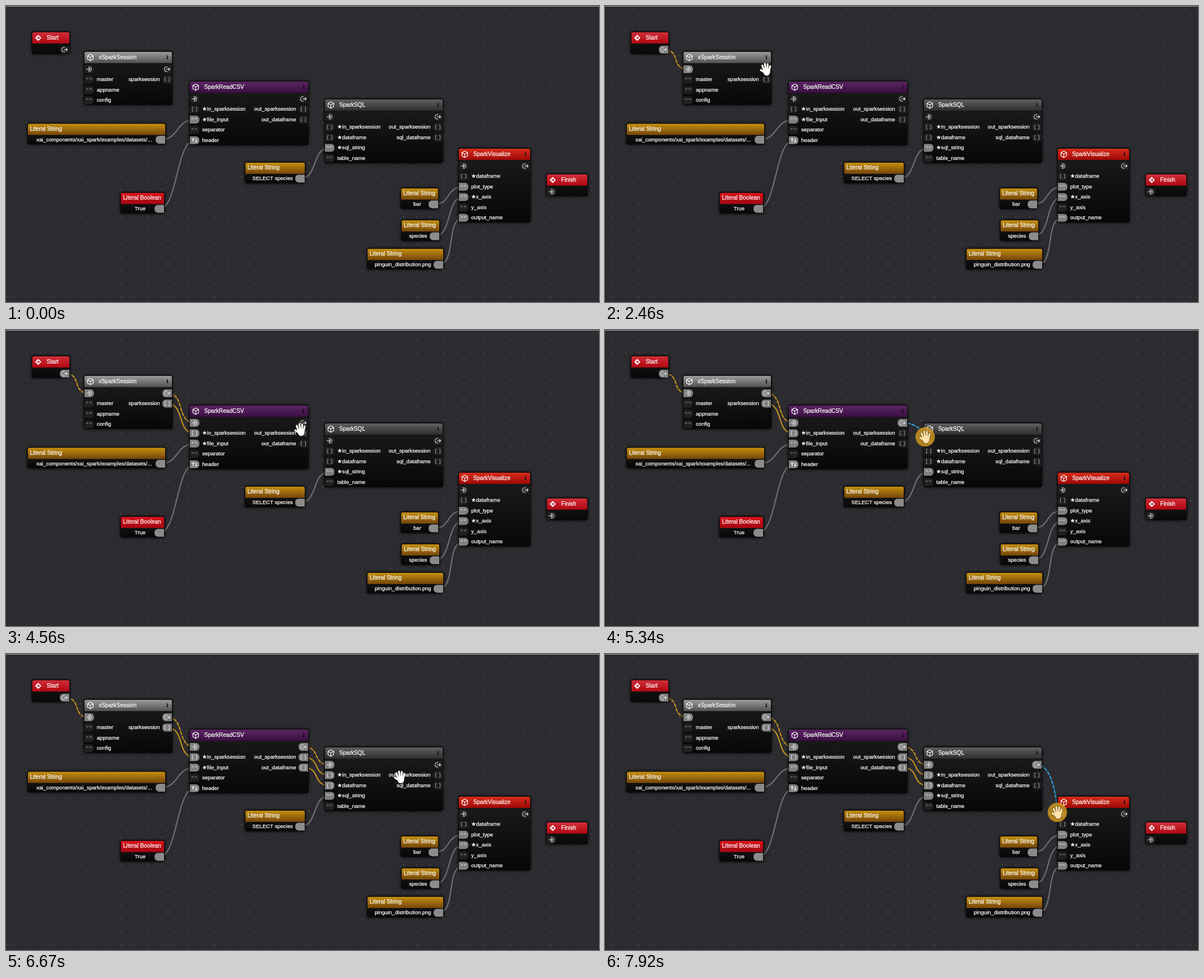
An HTML page with a canvas that plays this animation: 1058 px wide and 529 px high, repeating every 7.99 s.

```html
<!DOCTYPE html>
<html lang="en">
<head>
<meta charset="utf-8">
<title>Node graph</title>
<style>
html, body { margin: 0; width: 100%; height: 100%; overflow: hidden; background: #2c2b2f; }
canvas { display: block; }
</style>
</head>
<body>
<canvas id="stage" width="1058" height="529"></canvas>
<script>
const c = document.getElementById('stage').getContext('2d');
const LOOP = 7990, TAU = Math.PI * 2;
const FONT = '"Liberation Sans", Arial, "DejaVu Sans", sans-serif';
const RED = ['#d2303a', '#b00712'], GOLD = ['#c9930f', '#74450a'];

// Ports: first letter is the type (s string, l list, b boolean, x flow); a "!" marks one already wired.
const node = (title, x, y, w, h, head, ins, outs) => ({ title, x, y, w, h, head, ins, outs });
const start = node('Start', 46, 46, 68, 40, RED, [], ['x']);
const session = node('xSparkSession', 139, 81, 158, 96, ['#a0a0a0', '#505050'],
  ['x', 's master', 's appname', 's config'], ['x', 'l sparksession']);
const reader = node('SparkReadCSV', 327, 134, 213, 115, ['#5c2664', '#3a0f42'],
  ['x', 'l ★in_sparksession', 's!★file_input', 's separator', 'b!header'],
  ['x', 'l out_sparksession', 'l out_dataframe']);
const sql = node('SparkSQL', 568, 166, 212, 115, ['#626262', '#2e2e2e'],
  ['x', 'l ★in_sparksession', 'l ★dataframe', 's!★sql_string', 's table_name'],
  ['x', 'l out_sparksession', 'l sql_dataframe']);
const chart = node('SparkVisualize', 807, 254, 129, 133, ['#d9301c', '#a00808'],
  ['x', 'l ★dataframe', 's!plot_type', 's!★x_axis', 's y_axis', 's!output_name'], ['x']);
const finish = node('Finish', 964, 300, 74, 40, RED, ['x'], []);
const nodes = [start, session, reader, sql, chart, finish];

const literal = (x, y, w, value, to, row, title = 'Literal String', head = GOLD) =>
  ({ x, y, w, h: 38, value, to, row, title, head });
const literals = [
  literal(38, 209.5, 247, 'xai_components/xai_spark/examples/datasets/...', reader, 2),
  literal(204, 333, 79, 'True', reader, 4, 'Literal Boolean', ['#dc141e', '#a00710']),
  literal(426, 279, 108, 'SELECT species', sql, 3),
  literal(704, 325, 68, 'bar', chart, 2),
  literal(705, 382, 69, 'species', chart, 3),
  literal(644, 433, 137, 'pinguin_distribution.png', chart, 5)
];

// Wires made during the loop: pressed at, dropped at.
const wire = (from, a, to, b, press, drop) => ({ from, a, to, b, press, drop });
const wires = [
  wire(start, 0, session, 0, 1260, 1700),
  wire(session, 0, reader, 0, 2740, 3590),
  wire(session, 1, reader, 1, 3900, 3900),
  wire(reader, 0, sql, 0, 4800, 6230),
  wire(reader, 1, sql, 1, 6340, 6340),
  wire(reader, 2, sql, 2, 6340, 6340),
  wire(sql, 0, chart, 0, 7420, Infinity)
];

// Pointer path: time, x, y
const path = [
  [530, 62, 2], [940, 105, 76], [1400, 106, 77], [1550, 128, 104], [1690, 147, 111.5],
  [1830, 149, 112], [2180, 238, 112], [2390, 287, 113], [2890, 287, 113], [3020, 300, 125],
  [3370, 326, 160], [3520, 332, 166], [3899, 332, 166], [3900, 436, 208], [4550, 525, 178],
  [4700, 530, 168], [4980, 531, 167], [5550, 598, 207], [6150, 579, 203], [6339, 578, 202],
  [6340, 660, 230], [6460, 680, 227], [7200, 769, 198], [7350, 769, 196], [7440, 771, 198],
  [7570, 771, 198], [7900, 807, 283]
];

function pointerAt(t) {
  const i = path.findIndex(k => k[0] > t);
  if (i < 0) return path[path.length - 1].slice(1);
  const [t0, x0, y0] = path[i - 1], [t1, x1, y1] = path[i];
  const p = (t - t0) / (t1 - t0);
  return [x0 + (x1 - x0) * p, y0 + (y1 - y0) * p];
}

const rowY = (n, row) => n.y + 32 + 18.5 * row;
const inX = n => n.x + 9.5;
const outX = n => n.x + n.w - 9.5;

function text(s, x, y, size, align = 'left') {
  c.font = size + 'px ' + FONT;
  c.textAlign = align;
  c.textBaseline = 'middle';
  c.fillStyle = c.strokeStyle = '#fff';
  c.lineWidth = 0.25;
  c.fillText(s, x, y);
  c.strokeText(s, x, y);
}

function box(x, y, w, h, radii, fill) {
  c.beginPath();
  c.roundRect(x, y, w, h, radii);
  c.fillStyle = fill;
  c.fill();
}

function line(points, color, width) {
  c.beginPath();
  points.forEach(([x, y]) => c.lineTo(x, y));
  c.strokeStyle = color;
  c.lineWidth = width;
  c.stroke();
}

function shade(y, h, [top, bottom]) {
  const g = c.createLinearGradient(0, y, 0, y + h);
  g.addColorStop(0, top);
  g.addColorStop(1, bottom);
  return g;
}

function panel({ x, y, w, h, head }) {
  c.save();
  c.shadowColor = '#000';
  c.shadowBlur = 5;
  box(x, y, w, h, 4, '#0b0b0b');
  c.restore();
  box(x + 1, y + 1, w - 2, h - 2, 3, shade(y, h, ['#1d1d1d', '#070707']));
  box(x + 1, y + 1, w - 2, 20, [3, 3, 0, 0], shade(y, 21, head));
}

function flowIcon(x, y, out) {
  const ink = '#e0e0e0', facing = out ? Math.PI : 0;
  c.strokeStyle = ink;
  c.lineWidth = 1.1;
  c.beginPath();
  c.arc(out ? x - 1 : x, y, 4, facing - 2, facing + 2);
  c.stroke();
  const tip = out ? x + 5 : x + 1.5;
  line([[tip - 6.5, y], [tip, y]], ink, 1.2);
  line([[tip - 2.5, y - 2.5], [tip, y], [tip - 2.5, y + 2.5]], ink, 1.2);
}

function port(n, row, out, type, lit) {
  const y = rowY(n, row), mid = out ? outX(n) : inX(n);
  box(mid - 8.5, y - 7, 17, 14, out ? [6, 0, 0, 6] : [0, 6, 6, 0], lit ? '#808080' : '#202020');
  const ink = lit ? '#e4e4e4' : '#949494';
  if (type === 'x') flowIcon(mid, y, out);
  if (type === 's') {
    for (const dx of [-4.5, -2.5, 1.5, 3.5]) line([[mid + dx, y - 3], [mid + dx, y - 0.5]], ink, 1);
  }
  if (type === 'l') {
    for (const d of [-1, 1])
      line([[mid + d * 2, y - 3.5], [mid + d * 4, y - 3.5], [mid + d * 4, y + 3.5], [mid + d * 2, y + 3.5]], ink, 1);
  }
  if (type === 'b') {
    line([[mid - 5, y - 2.5], [mid, y - 2.5]], '#fff', 1.4);
    line([[mid - 2.5, y - 2.5], [mid - 2.5, y + 3]], '#fff', 1.4);
    line([[mid + 1, y + 2.5], [mid + 5, y + 2.5]], '#fff', 1.4);
    line([[mid + 3, y - 3], [mid + 3, y + 2.5]], '#fff', 1.4);
  }
}

function titleIcon(x, y, cube) {
  if (!cube) {
    c.beginPath();
    [[0, -5.5], [5.5, 0], [0, 5.5], [-5.5, 0]].forEach(([dx, dy]) => c.lineTo(x + dx, y + dy));
    c.fillStyle = '#fff';
    c.fill();
    line([[x - 2.5, y], [x + 2, y]], RED[1], 1.2);
    line([[x, y - 2], [x + 2, y], [x, y + 2]], RED[1], 1.2);
    return;
  }
  const ring = [0, 1, 2, 3, 4, 5, 6].map(i => [x + 5.8 * Math.sin(i * TAU / 6), y - 5.8 * Math.cos(i * TAU / 6)]);
  line(ring, '#fff', 1.2);
  for (const i of [1, 3, 5]) line([[x, y], ring[i]], '#fff', 1.1);
}

function drawNode(n, t) {
  const component = n.ins.length > 1, mid = n.y + 11;
  panel(n);
  titleIcon(n.x + 11.5, mid, component);
  text(n.title, n.x + 26.5, mid, 10.1);
  if (component) {
    c.font = 'bold 10px "DejaVu Serif", "Noto Serif", serif';
    c.textAlign = 'center';
    c.fillStyle = '#0c0c0c';
    c.fillText('i', n.x + n.w - 9, mid);
  }
  const side = (list, out) => list.forEach((spec, row) => {
    const lit = spec[1] === '!' || wires.some(w => out
      ? w.from === n && w.a === row && t >= w.press
      : w.to === n && w.b === row && t >= w.drop);
    port(n, row, out, spec[0], lit);
    text(spec.slice(2), out ? n.x + n.w - 22.5 : n.x + 23, rowY(n, row), 9.6, out ? 'right' : 'left');
  });
  side(n.ins, false);
  side(n.outs, true);
}

function drawLiteral(l) {
  panel(l);
  text(l.title, l.x + 4.7, l.y + 10.2, 10.2);
  text(l.value, l.x + l.w / 2 - 4.3, l.y + 29.5, 9.55, 'center');
  box(l.x + l.w - 18, l.y + 22.5, 17, 14, [6, 1, 1, 6], '#8b8b8b');
}

// Wires run between port centres and pass under the nodes.
function curve(x0, y0, x1, y1, color, pull = 33) {
  c.beginPath();
  c.moveTo(x0, y0);
  c.bezierCurveTo(x0 + 33, y0, x1 - pull, y1, x1, y1);
  c.strokeStyle = color;
  c.lineWidth = 2.2;
  c.stroke();
}

function drawWire(w, t, [px, py]) {
  if (t < w.press) return;
  const x = outX(w.from), y = rowY(w.from, w.a);
  if (!w.a) {
    c.setLineDash([7, 1.6]);
    c.lineDashOffset = -t * 0.016;
  }
  if (t < w.drop) curve(x, y, px, py, '#2a9fd8', 0);
  else curve(x, y, inX(w.to), rowY(w.to, w.b), '#c4921e');
  c.setLineDash([]);
}

function hand(x, y, fill) {
  const fingers = [[-3, 3, -6.5, -6.5], [-0.5, 0, -1.8, -9.5], [3, 0, 3.2, -9], [6, 2, 7.8, -5.5], [0, 7, -9, 1.5]];
  c.lineCap = 'round';
  for (const [grow, color] of [[1.4, 'rgba(40,30,10,.6)'], [0, fill]]) {
    for (const [a, b, d, e] of fingers) line([[x + a, y + b], [x + d, y + e]], color, 3.3 + grow);
    c.beginPath();
    c.ellipse(x + 1.5, y + 5, 6 + grow / 2, 6.5 + grow / 2, 0, 0, TAU);
    c.fillStyle = color;
    c.fill();
  }
  c.lineCap = 'butt';
}

function moveArrows(x, y, fill) {
  c.save();
  c.translate(x, y);
  for (let i = 0; i < 4; i++) {
    line([[0, 0], [0, -11]], fill, 2.6);
    c.beginPath();
    c.moveTo(0, -16.5);
    c.lineTo(5.5, -9.5);
    c.lineTo(-5.5, -9.5);
    c.fillStyle = fill;
    c.fill();
    c.rotate(TAU / 4);
  }
  c.restore();
}

function drawPointer(t, [x, y]) {
  const w = wires.find(w => t >= w.press && t < w.drop);
  if (!w) return hand(x, y, '#fff');
  c.beginPath();
  c.arc(x, y, 17.3, 0, TAU);
  c.fillStyle = 'rgba(201,148,30,.87)';
  c.fill();
  const near = (px, py) => Math.hypot(px - x, py - y) < 10.5;
  const onPort = near(outX(w.from), rowY(w.from, w.a)) || near(inX(w.to), rowY(w.to, w.b));
  (onPort ? hand : moveArrows)(x, y, '#fde3ac');
}

function drawBackground() {
  c.fillStyle = '#2c2b2f';
  c.fillRect(0, 0, 1058, 529);
  c.fillStyle = '#47464b';
  for (let x = 13; x < 1058; x += 24)
    for (let y = 17; y < 529; y += 24) {
      c.beginPath();
      c.arc(x, y, 1.2, 0, TAU);
      c.fill();
    }
  c.fillStyle = '#a9a9ab';
  c.fillRect(0, 0, 1058, 1);
}

function draw(time) {
  // Movement advances in steps of about 70 ms.
  const [base, step] = time < 1268 ? [530, 68] : [1268, 69.9];
  const t = base + Math.floor((time - base) / step) * step;
  const visible = t >= 530, at = visible ? pointerAt(t) : [0, 0];
  drawBackground();
  for (const l of literals) curve(outX(l), l.y + 29.5, inX(l.to), rowY(l.to, l.row), '#707070');
  for (const w of wires) drawWire(w, t, at);
  for (const n of nodes) drawNode(n, t);
  literals.forEach(drawLiteral);
  if (visible) drawPointer(t, at);
}

let origin;
function tick(now) {
  origin ??= now;
  draw((now - origin) % LOOP);
  requestAnimationFrame(tick);
}
requestAnimationFrame(tick);
</script>
</body>
</html>
```
